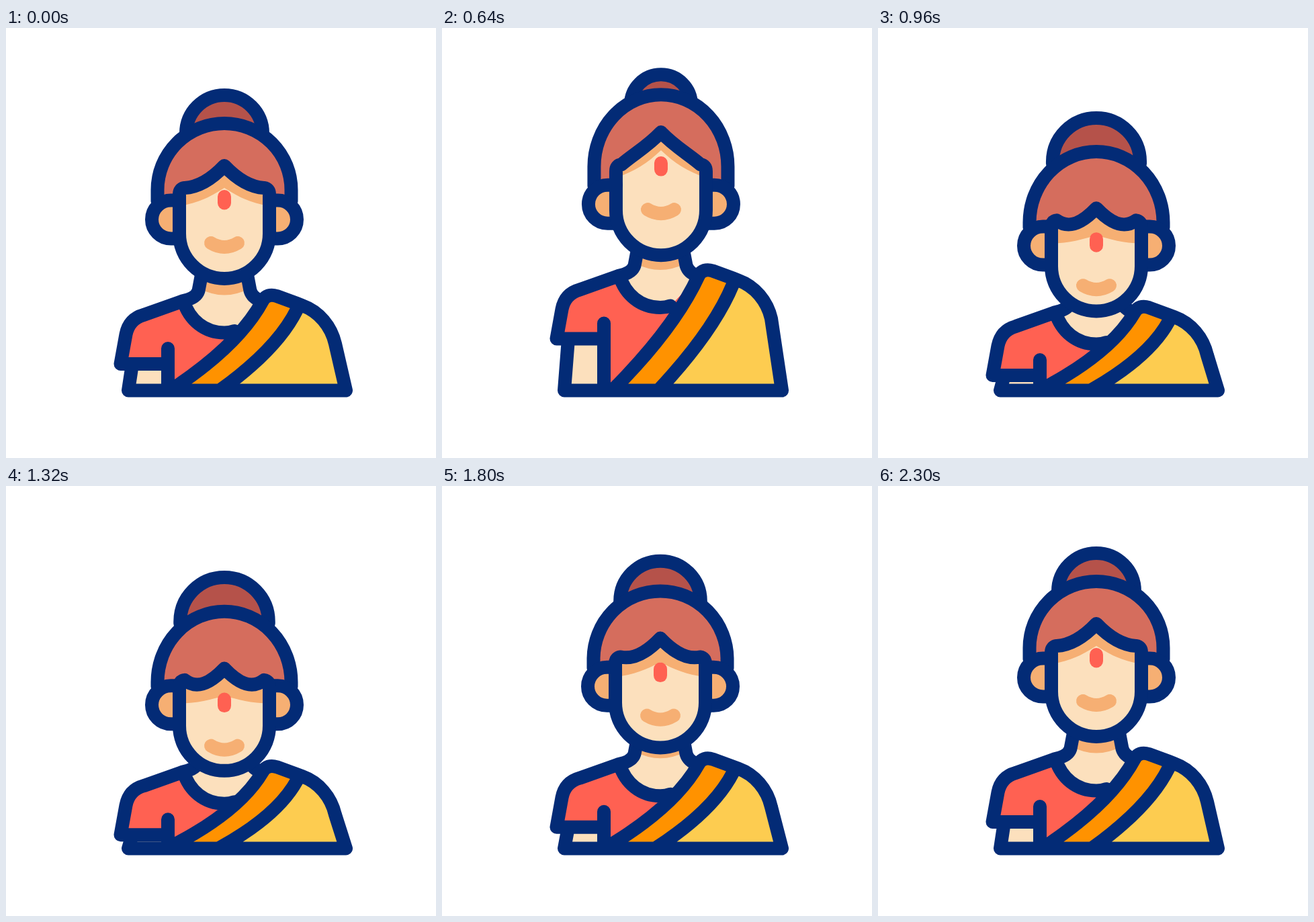
Write an HTML page that moves like this. It is 640x640 px and loops after 2400 ms.

```html
<!DOCTYPE html>
<html lang="en">
<head>
<meta charset="utf-8">
<title>Woman in a sari</title>
<style>
  html, body { margin: 0; width: 100%; height: 100%; overflow: hidden; background: #fff; }
  svg { display: block; width: 100vw; height: 100vh; }
  .line { fill: none; stroke: #032b76; stroke-width: 20; stroke-linecap: round; stroke-linejoin: round; }
</style>
</head>
<body>
<svg viewBox="0 0 640 640">
  <g id="body">
    <path id="arm" fill="#fce0bd"/>
    <path id="shirt" fill="#ff6152"/>
    <path id="neck" fill="#fce0bd"/>
    <path id="neckShade" fill="#f6af73"/>
    <path id="drape" fill="#fdcc50"/>
    <path id="sash" fill="#ff9200"/>
    <path id="bodyLines" class="line"/>
  </g>
  <g id="head">
    <path id="bun" fill="#b5524a"/>
    <path id="bunLine" class="line"/>
    <path id="hair" fill="#d56d5d"/>
    <path id="ears" fill="#f6af73"/>
    <path id="face" fill="#fce0bd"/>
    <path id="faceShade" fill="#f6af73"/>
    <path id="hairLine" class="line"/>
    <path id="earLines" class="line"/>
    <path id="faceLine" class="line"/>
    <g id="features">
      <rect x="315" y="241" width="20" height="29.5" rx="10" fill="#ff6152"/>
      <path d="M305,320 Q325,332 345,320" fill="none" stroke="#f6af73" stroke-width="20" stroke-linecap="round"/>
    </g>
  </g>
</svg>
<script>
const LOOP = 2400, STEP = 20, UP = 540, DOWN = 1080, REST = 2300;
const el = id => document.getElementById(id);
const set = (id, d) => el(id).setAttribute('d', d);

const ease = x => {
  x = Math.min(1, Math.max(0, x));
  return x < 0.5 ? 4 * x ** 3 : 1 - 4 * (1 - x) ** 3;
};

// Vertical offset: stretch to "high", squash to "low", settle at zero.
function bob(t, high, low, from = DOWN, to = 2340) {
  if (t >= REST) return 0;
  if (t < UP) return high * ease(t / UP);
  if (t < DOWN) return high + (low - high) * ease((t - UP) / (DOWN - UP));
  return low * (1 - ease((t - from) / (to - from)));
}

function drawBody(b) {
  const y = v => (v + b).toFixed(2);
  const part = (v, k) => (v + k * b).toFixed(2);
  const floor = 539.5;
  const sleeve = `M241,${y(500)} L170.5,${y(500)} L178.5,${y(456)}
    C181.5,${y(441)} 190.5,${y(431)} 205,${y(427)} L264,${y(406)}`;
  const collar = `C273,${y(435)} 296,${y(453.5)} 325,${y(453.5)} Q333,${y(453.5)} 340,${y(451)}`;
  const neckL = `M292,${y(362)} L286.5,${y(391)} Q283,${y(402)} 264,${y(406)}`;
  const neckR = `M358,${y(362)} L363.5,${y(391)} Q367,${y(402)} 380,${y(406)}`;
  const footL = `${part(244, -.25)},${floor}`, footR = `${part(318, -.1)},${floor}`;
  const bendL = `346,${part(473, .7)}`, bendR = `404,${part(478, .7)}`;
  const left = `M${footL} Q${bendL} 382,${y(406)}`;
  const cap = `C386,${y(398)} 394,${y(396)} 403,${y(399)} L433,${y(410)}`;
  const shoulder = `L441,${y(413)} C466,${y(422)} 484,${y(444)} 490,${y(470)} L506,${floor}`;
  const right = `433,${y(419)} Q${bendR} ${footR}`;

  set('arm', `M188,${y(500)} L182,${floor} H241 V${y(500)} Z`);
  set('shirt', `${sleeve} ${collar} L382,${y(406)} Q${bendL} ${footL} H241 Z`);
  set('neck', `${neckL} ${collar} L380,${y(406)} Q367,${y(402)} 363.5,${y(391)} L358,${y(362)} Z`);
  set('neckShade', `M292,${y(362)} L288,${y(388)} Q325,${y(407)} 362,${y(388)} L358,${y(362)} Z`);
  set('drape', `M${footR} Q${bendR} 433,${y(419)} ${shoulder} Z`);
  set('sash', `${left} ${cap} L${right} Z`);
  set('bodyLines', `${sleeve} ${collar} ${neckL} ${neckR}
    ${left} ${cap} ${shoulder} L182,${floor} L188,${y(500)}
    M${right} M241,${y(477)} V${floor}`);
}

function drawHead(t) {
  const brow = bob(t, -53, 68.5), chin = bob(t, -37, 52.3), crown = bob(t, -45, 46),
        top = bob(t, -32.5, 37), ear = bob(t, -24.5, 42);
  const at = d => v => (v + d).toFixed(2);
  const a = at(brow), c = at(chin), h = at(crown), e = at(ear), m = at((brow + chin) / 2);

  const r = 57 + crown - top;
  const bun = `M${325 - r},${h(160)} V${h(157)} A${r},${r} 0 0 1 ${325 + r},${h(157)} V${h(160)}`;
  set('bun', bun + ' Z');
  set('bunLine', bun);

  const ry = 99 + chin - crown;
  const dome = `M225.5,${e(258)} V${c(241)} A99.5,${ry} 0 0 1 424.5,${c(241)} V${e(258)}`;
  set('hair', dome + ' Z');
  set('hairLine', dome);

  const earL = `M258,${e(256.5)} H245.5 A28.5,28.5 0 0 0 245.5,${e(313.5)} H258`;
  const earR = `M392,${e(256.5)} H404.5 A28.5,28.5 0 0 1 404.5,${e(313.5)} H392`;
  set('ears', `${earL} Z ${earR} Z`);
  set('earLines', `${earL} ${earR}`);

  const fringe = `V${c(248)} Q258,${c(239)} 266,${c(238)}
    C285,${a(237)} 305,${a(226)} 325,${a(205)}
    C345,${a(226)} 365,${a(237)} 384,${c(238)} Q392,${c(239)} 392,${c(248)}`;
  const face = `M258,${c(306)} ${fringe} V${c(306)} A67,67 0 0 1 258,${c(306)} Z`;
  set('face', face);
  set('faceLine', face);

  const mid = at(brow * 1.12), side = at(brow * .94);
  set('faceShade', `M258,${m(265)} ${fringe} V${m(265)}
    C365,${side(261)} 345,${a(251)} 325,${mid(238)}
    C305,${a(251)} 285,${side(261)} 258,${m(265)} Z`);

  el('features').setAttribute('transform', `translate(0 ${brow.toFixed(2)})`);
  el('head').setAttribute('transform', `translate(${Math.max(0, -chin / 37).toFixed(2)} 0)`);
}

function draw(now) {
  const t = Math.floor((now % LOOP) / STEP) * STEP;
  drawBody(bob(t, -39, 19.6, 1100, 2400));
  drawHead(t);
}

function tick(now) {
  draw(now);
  requestAnimationFrame(tick);
}

draw(0);
requestAnimationFrame(tick);
</script>
</body>
</html>
```
